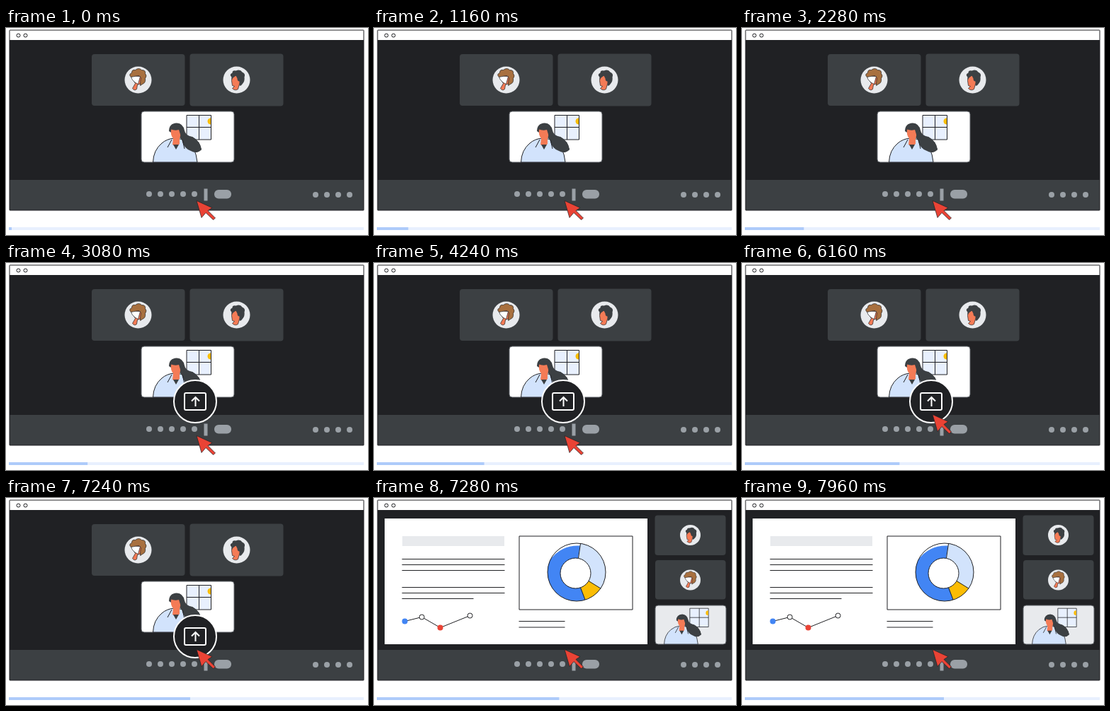
An HTML page for the animation above (8 s loop, 511 by 293 pixels).

```html
<!DOCTYPE html>
<html lang="en">
<head>
<meta charset="utf-8">
<title>Presenting in a video call</title>
<style>
html, body { margin: 0; width: 100%; height: 100%; overflow: hidden; background: #fff; }
svg { display: block; width: 511px; height: 293px; }
.ink { stroke: #202124; stroke-width: 1; }
.thin { stroke: #202124; stroke-width: .7; }
.tile { fill: #3c4043; }
.control { fill: #9aa0a6; }
.skin { fill: #f47b56; }
.hair { fill: #3c4043; }
</style>
</head>
<body>
<svg viewBox="0 0 511 293" fill="none">
  <defs>
    <g id="curly">
      <circle r="19" fill="#e8eaed"/>
      <path class="skin thin" d="M-8-7L7-7Q9-1 4 5L-1 7-2 13Q-5 16-8 12L-4 5-7 0z"/>
      <path fill="#a8703f" class="thin" d="M-10-4Q-14-8-9-10-9-15-4-14 1-18 5-14 11-14 10-9 13-6 10-2 11 4 6 6L3 8Q3 2 4-3L1-6-4-5-7-3z"/>
      <path fill="#fff" class="thin" d="M-10-4Q-4-6 3-5L0 6Q-5 4-8 0z"/>
    </g>
    <g id="short">
      <circle r="19" fill="#e8eaed"/>
      <path class="skin thin" d="M-6-6L5-6Q9 0 4 6L2 13Q-2 16-6 12L-3 9-6 8-7 1z"/>
      <path class="hair" d="M-7-4Q-11-8-6-10-6-14-1-13 5-16 8-11 13-9 11-4 12 2 8 6 6 9 4 8L4 2Q1 2 1-2L-1-6-5-3-7 0z"/>
    </g>
    <g id="presenter">
      <path fill="#e8f0fe" class="ink" d="M64 5.500H98.500V40H64zM81.500 5.500V40M64 22.500H98.500"/>
      <path fill="#fbbc04" d="M98 9.500A4.500 4.500 0 0 0 98 18.500z"/>
      <path class="hair" d="M39 28Q39 17 50 16.500 59 17 61 27 62 34 72 36 83 42 85 54 78 61 70 56 62 54 59 45 57 37 50 35z"/>
      <path fill="#d2e3fc" class="ink" d="M16.500 72Q17 55 29 45 36 39 46 38L55 39Q69 42 74 53 78 61 79 72z"/>
      <path class="hair" d="M56 34Q60 36 72 36 83 42 85 54 78 61 70 56 61 53 58 43z"/>
      <path class="skin" d="M42 27Q43 20 50 20L55 28Q56 35 54 38L54 46 49 50 44 47 45 38Q41 34 42 27z"/>
      <path class="hair" d="M41 25Q43 17 50 17 58 18 59 28L56 36Q54 29 53 26 47 28 41 25zM45 47L53 47 49 54z"/>
      <path class="ink" d="M43 40L37 51M58 40L61 53"/>
    </g>
  </defs>

  <path fill="#202124" d="M5 3H505V258H5z"/>
  <path fill="#fff" d="M5 3H505V17H5z"/>
  <g class="ink"><circle cx="17.500" cy="10.500" r="2.500"/><circle cx="27.500" cy="10.500" r="2.500"/></g>
  <path class="tile" d="M5 215H505V258H5z"/>
  <rect class="ink" x="5" y="3" width="500" height="255" rx=".5"/>

  <g id="call">
    <rect class="tile" x="121" y="37" width="131.500" height="73" rx="4"/>
    <rect class="tile" x="259.500" y="36.500" width="132" height="74" rx="4"/>
    <use href="#curly" x="186.500" y="73.500"/>
    <use href="#short" x="325.500" y="73.500"/>
    <rect x="191" y="118" width="131" height="72" rx="4" fill="#fff" stroke="#5f6368"/>
    <use href="#presenter" x="191" y="118"/>
  </g>

  <g id="slides">
    <path fill="#fff" d="M15 29H386V207H15z"/>
    <path fill="#e8eaed" d="M40 54H184V68H40z"/>
    <path class="ink" d="M39.500 86.500H184.500M39.500 94.500H184.500M39.500 102.500H184.500M39.500 126.500H184.500M39.500 134.500H184.500M39.500 142.500H140.500M204.500 174.500H269.500M204.500 183H269.500M205 54H365V158H205z"/>
    <path class="ink" d="M43.500 174.500L67.500 168.500 93.500 183.500 135.500 166.500"/>
    <circle cx="43.500" cy="174.500" r="4" fill="#4285f4"/>
    <circle cx="93.500" cy="183.500" r="4" fill="#ea4335"/>
    <g fill="#fff" class="ink"><circle cx="67.500" cy="168.500" r="3.500"/><circle cx="135.500" cy="166.500" r="3.500"/></g>
    <path fill="#d2e3fc" d="M291.500 64.500A41 41 0 0 1 320 128L303 117.500 288 85z"/>
    <path fill="#fbbc04" d="M320 128A41 41 0 0 1 298 144L291 127 303 117z"/>
    <path fill="#4285f4" d="M298 144A41 41 0 0 1 249 87Q265 66 291 67.500L288 85 285 106z"/>
    <circle cx="284.500" cy="106.500" r="21.500" fill="#fff" class="ink"/>
    <path class="ink" d="M291.500 64.500L288.500 85M320 128L303 117.500M298 144L291.500 127"/>
    <circle cx="286" cy="105" r="41" class="ink"/>
    <rect class="tile" x="396.500" y="24.500" width="100" height="56.500" rx="4"/>
    <rect class="tile" x="397" y="88" width="99.500" height="55.500" rx="4"/>
    <use href="#short" transform="translate(446.500 52.500) scale(.763)"/>
    <use href="#curly" transform="translate(446.500 116) scale(.763)"/>
    <rect x="397" y="152" width="100" height="55" rx="4" fill="#e8eaed" stroke="#5f6368"/>
    <use href="#presenter" transform="translate(397 152) scale(.763)"/>
  </g>

  <g class="control" id="controls">
    <path d="M279.500 227.500H284.500V244.500H279.500z"/>
    <rect x="294" y="229" width="24" height="12.500" rx="6"/>
  </g>

  <g id="bubble" stroke="#fff" stroke-width="2">
    <circle cx="267" cy="196" r="30" fill="#202124"/>
    <rect x="252" y="184" width="30" height="24" rx="2"/>
    <path d="M267.500 203V190M262 195.500L267.500 190 273 195.500"/>
  </g>

  <path id="cursor" fill="#ea4335" class="thin" d="M269 244.500L291 254.500 285 258.500 295.500 269 292.500 271.500 282 261.500 276 268.500z"/>

  <path fill="#e8f0fe" d="M4 282H505V286H4z"/>
  <rect id="progress" x="4" y="282" height="4" fill="#aecbfa"/>
</svg>
<script>
const LOOP = 8000, SLIDES_AT = 7280;
const $ = id => document.getElementById(id);
const controls = $('controls');

function addDots(firstX, y, count) {
  for (let i = 0; i < count; i++) {
    const dot = document.createElementNS('http://www.w3.org/2000/svg', 'circle');
    for (const [key, value] of Object.entries({ cx: firstX + 16 * i, cy: y, r: 4 })) dot.setAttribute(key, value);
    controls.append(dot);
  }
}
addDots(202, 235, 5);
addDots(437, 236, 4);

// Smooth 0..1 ramp between two times.
function ease(t, from, to) {
  const p = Math.min(1, Math.max(0, (t - from) / (to - from)));
  return p * p * (3 - 2 * p);
}

function draw(now) {
  const t = Math.floor((now % LOOP) / 40) * 40;
  const presenting = t >= SLIDES_AT;
  $('call').style.display = presenting ? 'none' : '';
  $('slides').style.display = presenting ? '' : 'none';
  $('bubble').setAttribute('opacity', presenting ? 0 : ease(t, 2640, 2900));
  $('cursor').setAttribute('transform', `translate(0 ${-30 * ease(t, 4360, 4920)})`);
  $('progress').setAttribute('width', 4 + t * 0.0348);
  requestAnimationFrame(draw);
}
requestAnimationFrame(draw);
</script>
</body>
</html>
```
